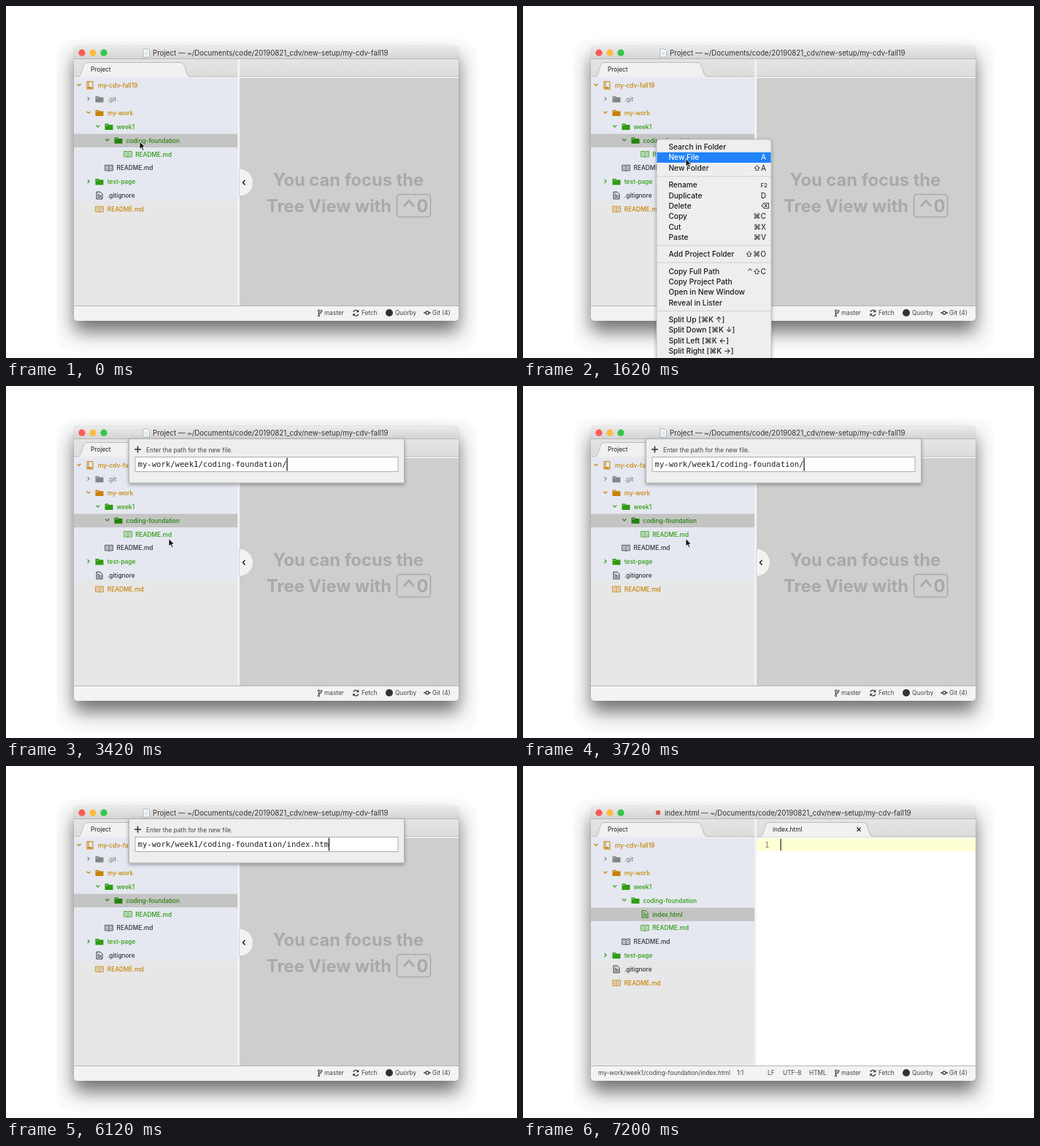
An HTML page that plays this animation: 700x483 px, repeating every 7260 ms.

```html
<!DOCTYPE html>
<html lang="en">
<head>
<meta charset="utf-8">
<title>New file</title>
<style>
html, body { margin: 0; width: 100%; height: 100%; overflow: hidden; background: #fff; }
#halo { position: absolute; left: 70px; top: 46px; width: 575px; height: 429px; border-radius: 24px; background: #fbfbfb; }
#shadow { position: absolute; left: 93px; top: 55px; width: 527px; height: 377px; border-radius: 5px;
  box-shadow: 0 0 1px rgba(0,0,0,.4), 0 15px 24px rgba(0,0,0,.55); }
svg { position: absolute; left: 0; top: 0; }
text { font-family: Inter, "DejaVu Sans", sans-serif; white-space: pre; }
.mono { font-family: "DejaVu Sans Mono", monospace; }
</style>
</head>
<body>
<div id="halo"></div>
<div id="shadow"></div>
<svg id="stage" width="700" height="483" viewBox="0 0 700 483"></svg>
<script>
const LOOP = 7260, STEP = 60;
const MENU = 420, DIALOG = 3420, HIDE_MOUSE = 4680, CREATED = 6540, OPENED = 6960;
const FOLDER = 'my-work/week1/coding-foundation/', FILE = 'index.html';
const ROOT = '~/Documents/code/20190821_cdv/new-setup/my-cdv-fall19';
const KEYS = [4860, 5040, 5220, 5400, 5520, 5700, 5820, 5940, 6060, 6180];
const MOUSE = [[0, 183, 186], [720, 183, 186], [900, 208, 200], [1380, 223, 209.5]];
const GREEN = '#2f9c10', ORANGE = '#c98208', GREY = '#858585', DARK = '#333';

const rect = (x, y, w, h, fill, more = '') =>
  `<rect x="${x}" y="${y}" width="${w}" height="${h}" fill="${fill}" ${more}/>`;
const text = (x, y, s, size = 8.3, fill = DARK, more = '') =>
  `<text x="${x}" y="${y}" font-size="${size}" fill="${fill}" ${more}>${s}</text>`;
const line = (d, color, w = 1) =>
  `<path d="${d}" fill="none" stroke="${color}" stroke-width="${w}"/>`;
const shape = (d, fill, more = '') => `<path d="${d}" fill="${fill}" ${more}/>`;
const dot = (x, y, r, fill, more = '') => `<circle cx="${x}" cy="${y}" r="${r}" fill="${fill}" ${more}/>`;

// Tree icons, each centred on (x, y)
const icons = {
  folder: (x, y, c) => shape(`M${x - 5.5} ${y + 4.3}v-8.3h4.6l1 1.5h5.4v6.8z`, c) +
    line(`M${x - 4.5} ${y - 2}h3.4`, '#e6e8f0', .6),
  book: (x, y, c) => line(`M${x - 5.3} ${y - 3.8}h4.3l1 .8 1-.8h4.3v7.4h-4.3l-1 .8-1-.8h-4.3zM${x} ${y - 3}v7`, c, .9) +
    line(`M${x - 4} ${y - 1.5}h2.6m-2.6 2.6h2.6M${x + 1.4} ${y - 1.5}h2.6m-2.6 2.6h2.6`, c, .8),
  file: (x, y, c) => line(`M${x - 4} ${y - 4.8}h5l3 3v6.6h-8zM${x - 2.4} ${y - 1.6}h2.6m-2.6 2h5m-5 2h5`, c, 1),
  repo: (x, y, c) => line(`M${x - 4} ${y - 5.3}h8v8.4h-8zM${x - 2} ${y - 5.3}v8.4M${x - 4} ${y + 3}v2h2m3 0h3v-2`, c, 1) +
    shape(`M${x - 1.7} ${y + 2}h3v4l-1.5-1.2-1.5 1.2z`, c)
};

function treeRow([depth, icon, name, color, arrow], i, selected) {
  const y = 109 + i * 18.87, cx = 100 + 12.9 * depth;
  let out = selected ? rect(93, y - 9, 224.5, 18.5, '#c4c4c4') : '';
  if (arrow) out += line(arrow === 'v' ? `M${cx - 2.5} ${y - 2}l2.5 2.5 2.5-2.5` : `M${cx - 1.3} ${y - 3}l2.5 2.5-2.5 2.5`, color, 1.2);
  return out + icons[icon](115 + 13 * depth, y, color) +
    text(126 + 12.8 * depth, y + 3.2, name, 8.3, color, 'font-weight="450"');
}

function tree(t) {
  const rows = [
    [0, 'repo', 'my-cdv-fall19', ORANGE, 'v'],
    [1, 'folder', '.git', GREY, '>'],
    [1, 'folder', 'my-work', ORANGE, 'v'],
    [2, 'folder', 'week1', GREEN, 'v'],
    [3, 'folder', 'coding-foundation', t < OPENED ? '#238009' : GREEN, 'v'],
    [4, 'book', 'README.md', GREEN],
    [2, 'book', 'README.md', DARK],
    [1, 'folder', 'test-page', GREEN, '>'],
    [1, 'file', '.gitignore', DARK],
    [1, 'book', 'README.md', ORANGE]
  ];
  if (t >= CREATED) rows.splice(5, 0, [4, 'file', FILE, t < OPENED ? GREEN : '#238009']);
  const chosen = t < OPENED ? 4 : 5;
  return rows.map((r, i) => treeRow(r, i, i === chosen)).join('');
}

const tab = (x, w, name) =>
  shape(`M${x} 97.5C${x + 6} 95 ${x + 5} 77.5 ${x + 12} 77.5H${x + w - 13}C${x + w - 5} 77.5 ${x + w - 7} 95 ${x + w} 97.5z`,
    '#f1f1f1') +
  line(`M${x} 97C${x + 6} 95 ${x + 5} 77.5 ${x + 12} 77.5H${x + w - 13}C${x + w - 5} 77.5 ${x + w - 7} 95 ${x + w} 97`,
    '#b2b2b2', .8) +
  text(x + 17, 90, name, 8.3, '#222');

function titleBar(t) {
  const open = t >= OPENED;
  const x = open ? 194 : t < CREATED ? 201 : 225.5;
  const prefix = open ? FILE + ' — ' : t < CREATED ? 'Project — ' : '';
  const icon = open ? dot(185, 64, 3.2, '#d6584c')
    : shape(`M${x - 13} 59h6l2.5 2.5v8.5h-8.5z`, '#fff', 'stroke="#9aa7b3" stroke-width=".8"') +
      line(`M${x - 11.3} 63h4.5m-4.5 2h5m-5 2h5`, '#a9c3d8', .8);
  return shape('M93 73V60a5 5 0 0 1 5-5H615a5 5 0 0 1 5 5V73z', 'url(#bar)') +
    rect(93, 72, 527, 1, '#b8b8b8') +
    dot(104, 64.2, 4.6, '#fc5b55') + dot(119, 64.2, 4.6, '#fdbc40') + dot(134, 64.2, 4.6, '#34c648') +
    icon + text(x, 67.8, prefix + ROOT, 9.7, '#333');
}

function emptyPane(t) {
  const ink = t < CREATED ? '#a9a9a9' : '#a1a1a1';
  const big = 'font-weight="700"';
  return rect(320, 99, 300, 313, t < CREATED ? '#cecece' : '#c6c6c6') +
    text(469, 247, 'You can focus the', 23.7, ink, big + ' text-anchor="middle"') +
    text(357, 283, 'Tree View with', 23.7, ink, big) +
    rect(535.5, 258.5, 46, 31, 'none', `rx="4" stroke="${ink}" stroke-width="1.6"`) +
    line('M545 275l7-8 7 8', ink, 2.8) + text(562.5, 283, '0', 23.7, ink, big);
}

function editor(t) {
  return rect(320, 99, 300, 313, '#fff') + rect(320, 99.5, 300, 17, '#ffffd4') +
    text(331, 111.5, '1', 10.6, '#888', 'class="mono"') +
    (blink(t - OPENED) ? rect(352.5, 100, 1.2, 16, '#222') : '') +
    tab(325, 154, FILE) + line('M457.5 84.5l5 5m0-5l-5 5', '#333', 1.5);
}

function statusBar(t) {
  const put = (x, s) => text(x, 424.4, s, 8.3, '#444');
  let out = shape('M93 412H620V427a5 5 0 0 1-5 5H98a5 5 0 0 1-5-5z', '#f3f3f3') + rect(93, 411, 527, 1, '#b5b5b5') +
    put(436, 'master') + put(487, 'Fetch') + put(533, 'Quorby') + put(584, 'Git (4)') +
    line('M428.5 419v5M432 419.5c0 3-3.5 1.5-3.5 4', DARK, 1.2) +
    [[428.5, 418], [432, 418.5], [428.5, 425]].map(p => dot(...p, 1.2, '#f3f3f3', `stroke="${DARK}" stroke-width=".9"`)).join('') +
    line('M475.8 420a3.4 3.4 0 0 1 6.2-1m.8 3.5a3.4 3.4 0 0 1-6.2 1', DARK, 1.2) +
    shape('M483.3 416.6v3.6h-3.6zM475.2 425.8v-3.6h3.6z', DARK) +
    dot(525, 421, 5, '#333') +
    line('M572 421h10', DARK, 1.3) + dot(577, 421, 2.1, '#f3f3f3', `stroke="${DARK}" stroke-width="1.3"`);
  if (t >= OPENED) out += put(103, FOLDER + FILE) + put(293, '1:1') + put(335, 'LF') + put(356, 'UTF-8') + put(392, 'HTML');
  return out;
}

const MENU_ITEMS = [
  ['Search in Folder'], ['New File', 'A'], ['New Folder', '⇧A'], 0,
  ['Rename', 'F2'], ['Duplicate', 'D'], ['Delete', '⌫'], ['Copy', '⌘C'], ['Cut', '⌘X'], ['Paste', '⌘V'], 0,
  ['Add Project Folder', '⇧⌘O'], 0,
  ['Copy Full Path', '⌃⇧C'], ['Copy Project Path'], ['Open in New Window'], ['Reveal in Lister'], 0,
  ['Split Up [⌘K ↑]'], ['Split Down [⌘K ↓]'], ['Split Left [⌘K ←]'], ['Split Right [⌘K →]']
];

function menu(mouseY) {
  let out = rect(183, 183, 157, 310, '#eee', 'rx="4" stroke="#b4b4b4" stroke-width=".8" filter="url(#soft)"');
  let y = 193.4;
  for (const item of MENU_ITEMS) {
    if (!item) {
      out += rect(183.5, y - 3.4, 156, 1.2, '#d4d4d4');
      y += 9;
      continue;
    }
    const [name, key] = item;
    const lit = mouseY > y - 7 && mouseY <= y + 7.3;
    const ink = lit ? '#fff' : '#1c1c1c';
    if (lit) out += rect(183.4, y - 7, 156.2, 14.3, '#1f82f8');
    out += text(199.4, y + 3.7, name, 10.2, ink, 'font-weight="450"');
    if (key) out += text(key === '⌫' ? 338 : key === 'F2' ? 335 : 333, y + 3.7, key, key === 'F2' ? 8 : 10.2, ink, 'text-anchor="end"');
    y += 14.35;
  }
  return out;
}

const blink = age => age % 1000 < 500;

function dialog(t) {
  const typed = KEYS.filter(k => k <= t).length;
  const last = typed ? KEYS[typed - 1] : DIALOG;
  const path = FOLDER + FILE.slice(0, typed);
  return rect(168.5, 72.5, 377, 60.5, '#eee', 'stroke="#aaa" stroke-width=".8" filter="url(#soft)"') +
    line('M180.5 82.5v9m-4.5-4.5h9', DARK, 1.6) +
    text(192, 91, 'Enter the path for the new file.', 8.3, '#444') +
    rect(177, 97.5, 360, 20, '#fff', 'stroke="#adadad"') +
    text(180.5, 111.2, path, 10.6, '#222', 'class="mono"') +
    (blink(t - last) ? rect(180.3 + path.length * 6.38, 98.5, 1.2, 18, '#111') : '');
}

function mouseAt(t) {
  const i = MOUSE.findIndex(m => m[0] > t);
  if (i < 0) return MOUSE[MOUSE.length - 1].slice(1);
  const [t0, x0, y0] = MOUSE[i - 1], [t1, x1, y1] = MOUSE[i];
  const k = (t - t0) / (t1 - t0);
  return [x0 + (x1 - x0) * k, y0 + (y1 - y0) * k];
}

const pointer = (x, y) =>
  shape(`M${x} ${y}v10.5l2.4-2.2 1.8 4 1.8-.8-1.8-3.9h3.3z`, '#111', 'stroke="#fff" stroke-width=".8"');

const DEFS = `<defs>
  <linearGradient id="bar" x2="0" y2="1"><stop stop-color="#ebebeb"/><stop offset="1" stop-color="#d3d3d3"/></linearGradient>
  <linearGradient id="tabs" x2="0" y2="1"><stop stop-color="#e4e4e4"/><stop offset="1" stop-color="#dcdcdc"/></linearGradient>
  <filter id="soft"><feDropShadow dx="0" dy="2" stdDeviation="2.5" flood-opacity=".35"/></filter>
</defs>`;

function scene(t) {
  const [mx, my] = mouseAt(t);
  const menuOpen = t >= MENU && t < DIALOG - 120;
  const toggle = !menuOpen && t < CREATED;
  return DEFS + titleBar(t) +
    rect(93, 73, 527, 26, 'url(#tabs)') + rect(93, 96.5, 527, 1, '#b8b8b8') +
    rect(93, 97.5, 527, 1.5, '#f1f1f1') + tab(99, 153, 'Project') +
    rect(93, 99, 225, 313, '#e7e7e7') + rect(93, 99, 225, 169, '#e5e8f0') +
    tree(t) + (t < OPENED ? emptyPane(t) : editor(t)) +
    rect(317.4, 73, 2.6, 339, '#f4f4f4') +
    (toggle ? shape('M319.5 223.2a19 19 0 0 1 0 38z', '#f2f2f2', 'stroke="#bbb" stroke-width=".6"') +
      line('M327.5 239l-3 3.3 3 3.3', '#222', 1.5) : '') +
    statusBar(t) +
    (menuOpen ? menu(my) : '') +
    (t >= DIALOG && t < CREATED - 60 ? dialog(t) : '') +
    (t < HIDE_MOUSE ? pointer(mx, my) : '');
}

const stage = document.getElementById('stage');
let shown;
function draw() {
  const now = performance.now() % LOOP;
  const html = scene(Math.floor(now / STEP) * STEP);
  if (html !== shown) stage.innerHTML = shown = html;
  requestAnimationFrame(draw);
}
draw();
</script>
</body>
</html>
```
